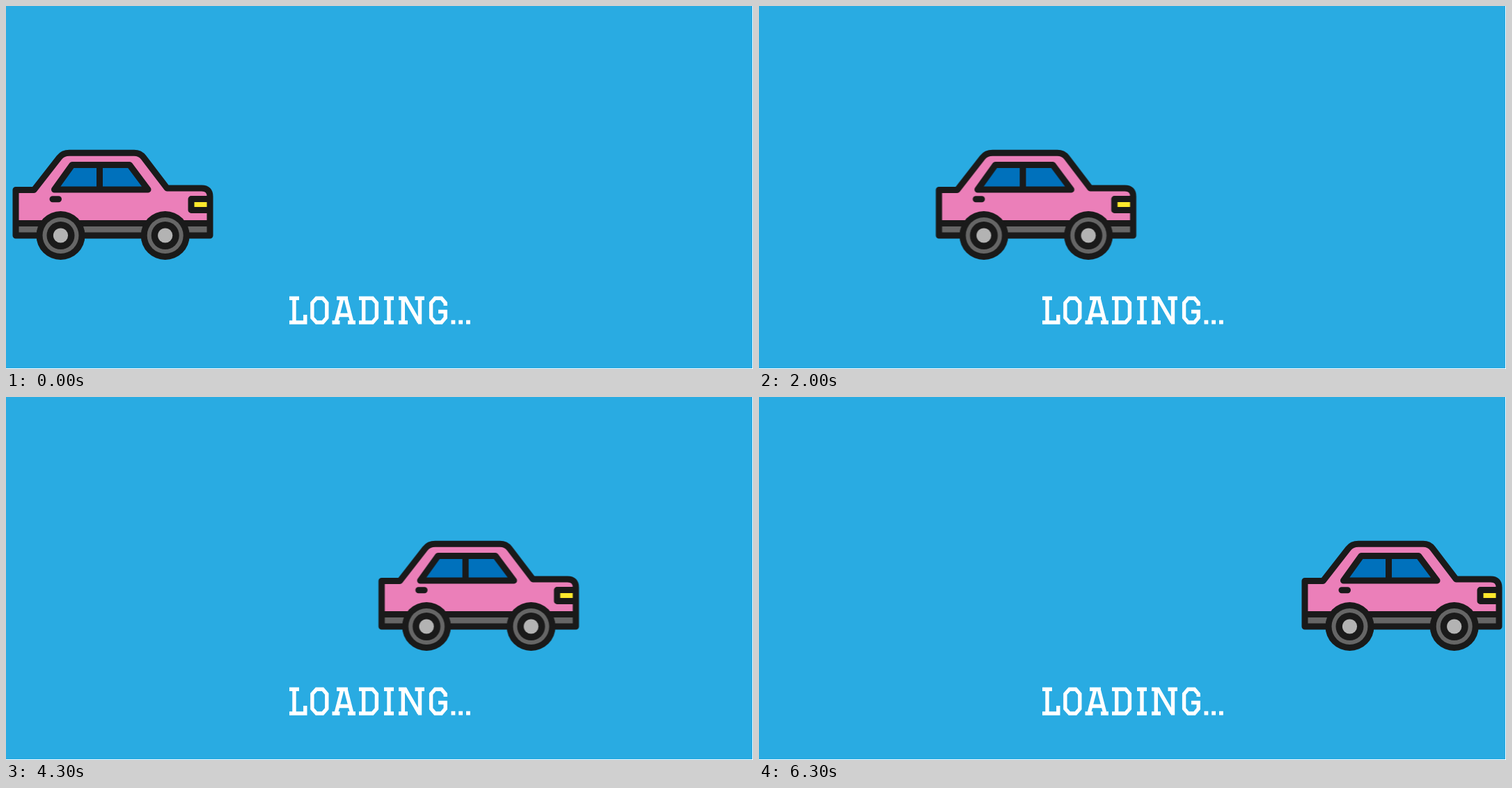
An HTML page for the animation above (6.4 s loop, 1073 by 522 pixels).

```html
<!DOCTYPE html>
<html lang="en">
<head>
<meta charset="utf-8">
<title>Loading</title>
<style>
  html, body { margin: 0; width: 100%; height: 100%; overflow: hidden; background: #fff; }
  svg { display: block; width: 1073px; height: 522px; }
  .line { fill: none; stroke: #1a1a1a; stroke-width: 9; stroke-linejoin: round; }
  .round { stroke-linecap: round; }
  .letters { fill: none; stroke: #fff; stroke-width: 5.4; stroke-miterlimit: 3; }
  .label { font: 52px "Noto Serif", serif; fill: transparent; }
</style>
</head>
<body>
<svg viewBox="0 0 1073 522">
  <defs>
    <g id="wheel">
      <circle r="35" fill="#1a1a1a"/>
      <circle r="26" fill="#666"/>
      <circle r="20" fill="#1a1a1a"/>
      <circle r="10.6" fill="#b3b3b3"/>
    </g>
    <path id="body" d="M14 264.5H40.2L76.4 218Q81.6 211.3 91 211.3H184Q192.7 211.3 197.8 218L231.3 262H281Q293 262 293 274V330H14Z"/>
    <path id="window" d="M69.5 264L95 228.5H177.5L204 264Z"/>
  </defs>

  <rect width="1072" height="521" fill="#29abe2"/>

  <g id="car">
    <use href="#body" fill="#eb7fb9"/>
    <rect x="14" y="312" width="279" height="18" fill="#666"/>
    <path class="line" d="M14 312.5H293"/>
    <use href="#window" fill="#0071bc"/>
    <path class="line" d="M134.5 228.5V264"/>
    <use href="#window" class="line"/>
    <path class="line round" d="M67 277.7H75.5"/>
    <path d="M266 277.6H293V293.4H266Z" fill="#ffe92c"/>
    <path class="line" d="M293 277.6H266V293.4H293"/>
    <use href="#body" class="line"/>
    <use href="#wheel" x="78.5" y="330"/>
    <use href="#wheel" x="228.7" y="330"/>
  </g>

  <!-- slab lettering, one path per letter, over selectable text -->
  <g class="letters" aria-hidden="true">
    <path d="M407 420.2H421M414 420.2V455M407 455H429.8V444"/>
    <path d="M446 420.2H455L460.8 427V448.3L455 455H446L439.9 448.3V427Z"/>
    <path d="M475 420.2H491M483 420.2L474 455M488 420.2L497 455M477 444.5H494M468.5 455H479.5M491 455H502"/>
    <path d="M507 420.2H526.5L532.4 427V448.3L526.5 455H507M513.7 420.2V455"/>
    <path d="M543 420.2H557M550 420.2V455M543 455H557"/>
    <path d="M564 420.2H573.5L593.5 455M570.3 420.2V455M564 455H577M587.5 420.2H601M594.5 420.2V457.6"/>
    <path d="M631.2 431V427L625.4 420.2H616.4L610.6 427V448.3L616.4 455H625.4L631.2 448.3V439.5H621"/>
    <path d="M639.5 454.6H645.3M650.2 454.6H656M661 454.6H666.8" stroke-width="5.8"/>
  </g>
  <text class="label" x="407" y="457">LOADING...</text>
</svg>
<script>
  const STEPS = 64, STEP_MS = 100, STRIDE = 770 / 63;

  document.getElementById("car").animate(
    [{ transform: "translateX(0px)" }, { transform: `translateX(${STEPS * STRIDE}px)` }],
    { duration: STEPS * STEP_MS, easing: `steps(${STEPS})`, iterations: Infinity }
  );
</script>
</body>
</html>
```
